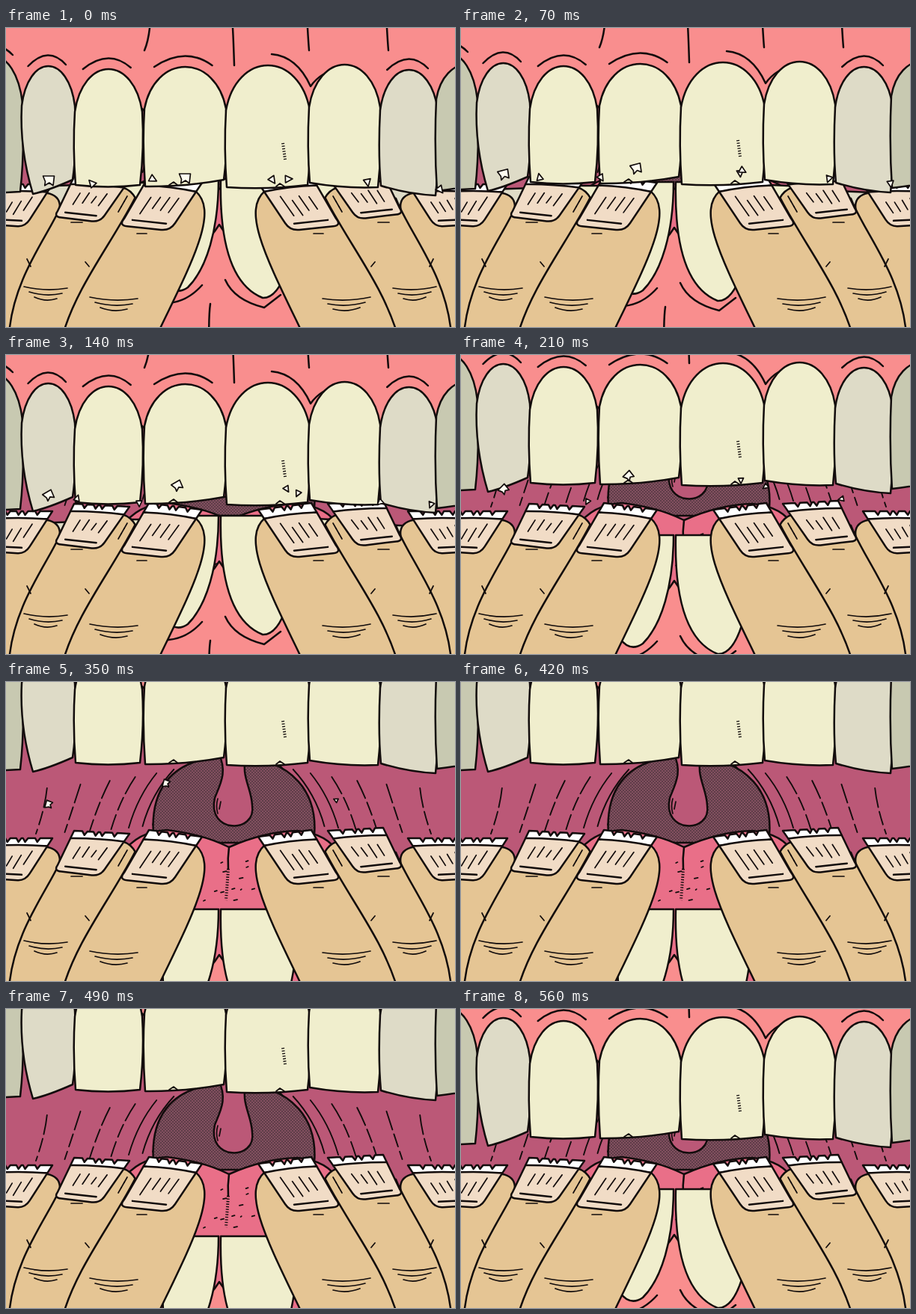
These frames come from a looping animation (600x400 px, 630 ms). An HTML page:

```html
<!DOCTYPE html>
<html>
<head>
<meta charset="utf-8">
<style>
html, body { margin: 0; width: 100%; height: 100%; overflow: hidden; }
svg { display: block; width: 100vw; height: 100vh; }
path { stroke: #120c0c; stroke-width: 2.5; stroke-linecap: round; stroke-linejoin: round; }
.thin path { stroke-width: 1.7; }
</style>
</head>
<body>
<svg id="stage" viewBox="0 0 600 400">
  <defs>
    <pattern id="halftone" width="4" height="4" patternUnits="userSpaceOnUse">
      <rect width="4" height="4" fill="#835060"/>
      <circle cx="1" cy="1" r="1" fill="#513640"/>
      <circle cx="3" cy="3" r="1" fill="#513640"/>
    </pattern>
  </defs>
</svg>
<script>
const CREAM = '#f0eecd', GREY = '#dedbc7', DIM = '#c8c9b1', GUM = '#f98e8e';
const WALL = '#bb5877', TONGUE = '#e96f88', SKIN = '#e5c594', NAIL = '#f1dcc6';

let seed = 7;
const random = (min, max) => {
  seed = seed * 16807 % 2147483647;
  return min + (max - min) * seed / 2147483647;
};
const times = (n, make) => Array.from({ length: n }, (_, i) => make(i)).join('');
const path = (d, fill = 'none', style = '') => `<path d="${d}" fill="${fill}" style="${style}"/>`;
const group = (content, attributes = '') => `<g ${attributes}>${content}</g>`;
const thin = content => group(content, 'class="thin"');
const hatch = d => path(d, 'none', 'stroke-width:4;stroke-dasharray:1.3 2.2;stroke-linecap:butt');
const mix = (a, b, t) => a.map((v, k) => v + (b[k] - v) * t);

// Folds of the cheek spread outwards from the throat on both sides.
const fold = (side, i) => {
  const top = 62 + 15 * i + 2.7 * i * i, bottom = 108 + 11 * i + 2.5 * i * i;
  const x = offset => 304 + side * offset;
  return path(`M${x(top)},${112 + 5 * i}Q${x(bottom - 12)},${145 + 4 * i} ${x(bottom)},${191 + 2 * i}`,
    'none', `stroke-width:1.9;stroke-dasharray:${i > 2 ? '26 6 18 7' : 'none'}`);
};
const speck = () => {
  const x = random(264, 334), y = random(232, 298);
  return path(`M${x},${y}l${random(1, 5)},-1`);
};
const mouth = `<rect width="600" height="400" fill="${WALL}"/>`
  + times(7, i => fold(-1, i) + fold(1, i))
  + path('M198,215C190,150 215,100 300,100S420,150 411,215Z', 'url(#halftone)')
  + path('M284,95C296,120 287,135 279,155C268,203 335,203 329,165C328,140 312,125 322,95', WALL)
  + thin(path('M283,156Q280,166 283,176M287,160L285,170'))
  + path('M155,230Q175,200 215,198Q265,204 298,221Q345,200 390,199Q430,203 445,230V410H155Z', TONGUE)
  + path('M298,221Q296,236 297,250') + hatch('M297,250L294,292') + thin(times(12, speck));

const lowerJaw = path('M150,330Q250,320 285,263Q320,320 440,330V540H150Z', GUM)
  + path('M40,212L150,208V290H50Z', GREY)
  + path('M150,207H215V290H160Z', CREAM)
  + path('M392,205L500,210L490,285L400,290Z', CREAM)
  + path('M500,214L570,217V290H505Z', GREY)
  + path('M205,202H284C284,270 268,322 243,347Q226,359 212,340Z', CREAM)
  + path('M287,202C285,290 303,345 343,361C368,362 388,310 391,202Z', CREAM)
  + path('M205,368Q238,371 262,344M293,337Q305,364 345,374L367,357M273,369Q270,390 272,450');

// Nail corners clockwise from the top left; the free edge is bitten.
function nail(a, b, c, d) {
  const at = (u, v) => mix(mix(a, b, u), mix(d, c, u), v);
  const bites = [.2, .4, .52, .74].flatMap(u => {
    const [x, y] = at(u, 0);
    return [at(u - .05, 0), [x - 1, y + 5], at(u + .04, 0)];
  });
  const tip = path(`M${[a, ...bites, b, at(1, .2), at(0, .2)].join('L')}Z`, '#fff');
  const body = path(`M${at(0, .2)}Q${at(.5, .15)} ${at(1, .2)}L${at(1, .9)}Q${at(1, 1.07)} ${at(.82, 1.07)}`
    + `L${at(.14, 1.07)}Q${at(-.03, 1.07)} ${at(0, .92)}Z`, NAIL);
  const grooves = times(4, i => {
    const u = .26 + i * .17;
    return path(`M${at(u, random(.32, .48))}L${at(u - .02, random(.62, .8))}`);
  });
  return tip + body + path(`M${at(.17, .93)}L${at(.84, .93)}`) + thin(grooves);
}

const knuckle = (x, y, width) => thin(times(3, i => {
  const half = width / 2 - 7 * i, top = y + 7 * i;
  return path(`M${x - half},${top - 2}Q${x},${top + 5} ${x + half},${top}`);
}));

// A hand is drawn as the left one; the other is its mirror image.
const hand = middleShift => path('M-20,222L50,220Q88,224 60,270L40,410H-20Z', SKIN)
  + nail([-12, 209], [62, 209], [28, 262], [-30, 259])
  + path('M78,228C60,275 10,330 4,410H150L180,250Q175,215 150,212Z', SKIN)
  + group(nail([91, 199], [165, 203], [128, 256], [67, 249]), `transform="translate(${middleShift})"`)
  + path('M172,228C140,290 95,345 76,410H202C250,310 285,245 253,218Z', SKIN)
  + nail([191, 198], [262, 207], [222, 267], [155, 260])
  + knuckle(53, 348, 58) + knuckle(144, 362, 64)
  + thin(times(3, i => path(`M${150 + 4 * i},${246 - 7 * i}l4,-7`))
    + path('M87,260h15M175,275h13M28,309l5,10M106,313l5,6'));

// Teeth: sides, top of the arch, where the arch starts, lower ends of both sides.
const tooth = (left, right, top, hip, leftEnd, rightEnd, fill, more) =>
  ({ left, right, top, hip, leftEnd, rightEnd, fill, inset: 1, ridge: true, ...more });
const teeth = [
  tooth(-55, 22, 38, 100, 215, 219, DIM),
  tooth(21, 92, 51, 104, 222, 203, GREY, { inset: 15 }),
  tooth(92, 182, 55, 112, 210, 210, CREAM),
  tooth(185, 294, 52, 108, 212, 203, CREAM),
  tooth(294, 406, 50, 110, 213, 210, CREAM, { ridge: false }),
  tooth(405, 500, 49, 106, 207, 213, CREAM, { ridge: false }),
  tooth(500, 577, 56, 110, 211, 224, GREY),
  tooth(575, 660, 48, 95, 218, 200, DIM, { ridge: false }),
];
function drawTooth({ left, right, top, hip, leftEnd, rightEnd, fill, inset, ridge }) {
  const width = right - left, middle = (left + right) / 2, low = (leftEnd + rightEnd) / 2;
  const shoulder = top + (hip - top) * .37;
  const outline = `M${left + inset},${leftEnd}Q${left - 3},${low - 50} ${left},${hip}`
    + `C${left + width * .06},${shoulder} ${left + width * .27},${top} ${middle},${top}`
    + `S${right - width * .06},${shoulder} ${right},${hip}`
    + `Q${right + 3},${low - 50} ${right - 3},${rightEnd}Q${middle},${low + 5} ${left + inset},${leftEnd}Z`;
  const arc = `M${left + width * .12},${top}Q${middle},${top - 28} ${right - width * .17},${top - 2}`;
  return path(outline, fill) + (ridge ? path(arc) : '');
}
const gumEdge = teeth.map(t => `L${t.left},${t.hip + 3}L${(t.left + t.right) / 2},${t.top + 10}`).join('');
const crease = (x, i) => path(`M${x},-120V0q${i ? 1 : -2},18 ${i ? 2 : -7},${i === 1 ? 50 : 30}`);
const upperJaw = path(`M-60,-200${gumEdge}L660,-200Z`, GUM)
  + [192, 303, 403, 509].map(crease).join('')
  + teeth.map(drawTooth).join('')
  + path('M355,35Q389,38 407,78Q414,68 424,62') + hatch('M370,154L373,176')
  + thin(path('M218,210l6,-4l5,4M361,212l5,-4l6,4'));

const stage = document.getElementById('stage');
stage.innerHTML += mouth + group(lowerJaw, 'id="lower"') + hand('0 0')
  + group(hand('4 -4'), 'transform="matrix(-1 0 0 1 599 0)"')
  + group(upperJaw, 'id="upper"') + group('', 'id="chips" class="thin"');

const STEP = 70;
const opening = [0, 4, 13, 39, 66, 102, 102, 102, 39];

// Nail chips fly off in straight lines and shrink; life is the last step they are seen.
const chip = (x, y, vx, vy, life, notched = false) => ({ x, y, vx, vy, life, notched, turn: random(0, 360) });
const chips = [
  chip(57, 204, 0, -8, 5, true), chip(239, 201, -5, -13, 5, true), chip(356, 203, 17, -9, 5),
  chip(196, 202, -9, -2, 4), chip(377, 202, -1, -11.5, 4), chip(483, 206, 8.5, -4.5, 4),
  chip(115, 208, -10, -8, 2), chip(580, 216, -6, -8, 2),
];
function drawChip({ x, y, vx, vy, life, notched, turn }, step) {
  if (step > life) return '';
  const d = notched ? 'M-1-.8L1-.8L.8 .9L.1 .4L-.7 .9L-.6 .2Z' : 'M1 0L-.6 .8L-.6-.8Z';
  const angle = notched ? -15 * step : turn + 30 * step;
  return `<path d="${d}" fill="#fffdf0" vector-effect="non-scaling-stroke" transform="translate(${x + vx * step} ${y + vy * step})`
    + ` rotate(${angle}) scale(${(notched ? 7.5 : 6) - step * .5})"/>`;
}

const part = id => document.getElementById(id);
let shown = -1;
function draw() {
  const step = Math.floor(performance.now() / STEP) % opening.length;
  if (step !== shown) {
    shown = step;
    part('upper').setAttribute('transform', `translate(0 ${-opening[step]})`);
    part('lower').setAttribute('transform', `translate(0 ${opening[step]})`);
    part('chips').innerHTML = chips.map(c => drawChip(c, step)).join('');
  }
  requestAnimationFrame(draw);
}
draw();
</script>
</body>
</html>
```
